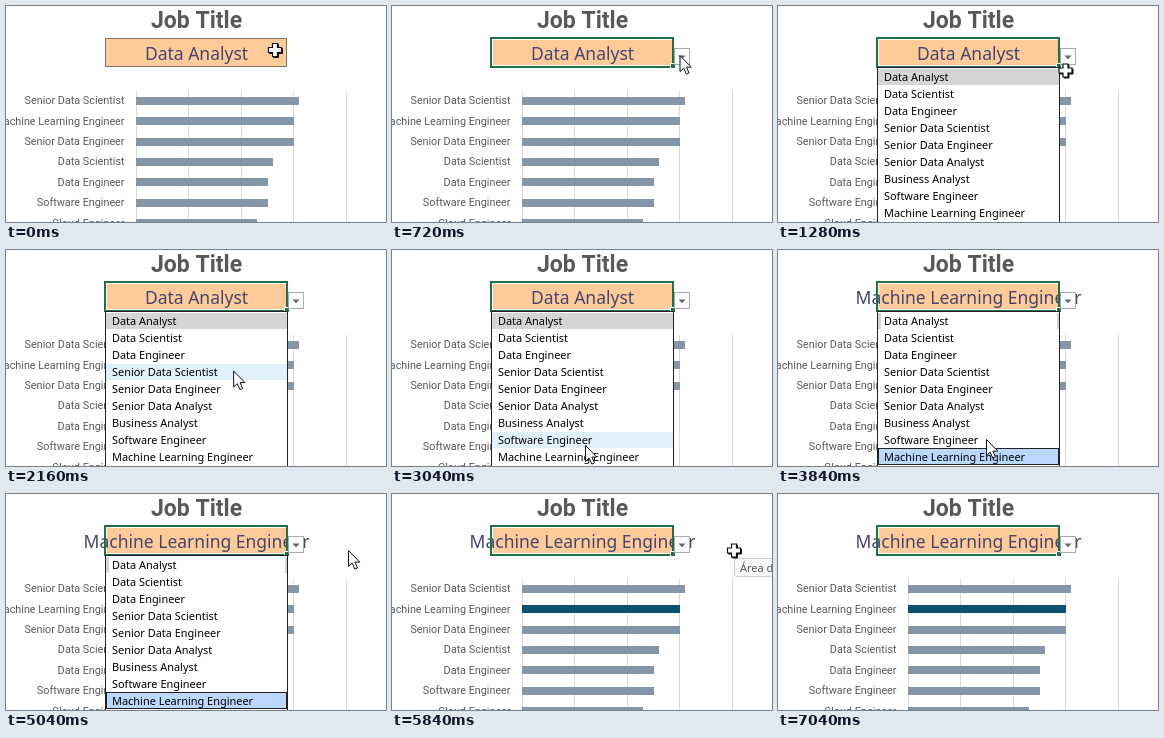
Write an HTML page with a canvas that moves like this. It is 380 px wide and 216 px high and loops after 7200 ms.

```html
<!DOCTYPE html>
<html lang="en">
<head>
<meta charset="utf-8">
<title>Job title dropdown</title>
<style>
  html, body { margin: 0; width: 100%; height: 100%; overflow: hidden; background: #fff; }
  canvas { display: block; width: 380px; height: 216px; }
</style>
</head>
<body>
<canvas id="stage"></canvas>
<script>
const W = 380, H = 216, LOOP = 7200, STEP = 80;
const canvas = document.getElementById('stage');
const ctx = canvas.getContext('2d');
const ratio = window.devicePixelRatio || 1;
canvas.width = W * ratio;
canvas.height = H * ratio;

const ROBOTO = 'Roboto, sans-serif', NOTO = '"Noto Sans", sans-serif';
const ML = 'Machine Learning Engineer';
const BARS = [
  ['Senior Data Scientist', 293], [ML, 288], ['Senior Data Engineer', 288],
  ['Data Scientist', 267], ['Data Engineer', 262], ['Software Engineer', 262],
  ['Cloud Engineer', 251]
];
const OPTIONS = [
  'Data Analyst', 'Data Scientist', 'Data Engineer', 'Senior Data Scientist',
  'Senior Data Engineer', 'Senior Data Analyst', 'Business Analyst',
  'Software Engineer', ML
];
const ROW = 17, LIST_TOP = 63;

// When each part of the interaction happens, in ms
const SELECT = 240, OPEN = 960, PICK = 3440, COMMIT = 3600, CLOSE = 5120;
const TIP_IN = 5600, TIP_OUT = 6560;

// Pointer path: time, x, y
const PATH = [
  [0, 269, 44], [320, 269, 44], [800, 289, 50], [1040, 289, 50],
  [1280, 287.5, 64.5], [1520, 287.5, 64.5], [2240, 225, 123], [2960, 225, 123],
  [3040, 193, 195.5], [3280, 198, 206], [3440, 198, 206], [3760, 208, 189.5],
  [3920, 208, 189.5], [4640, 342, 56.5], [6000, 342, 56.5], [6240, 395, 56.5]
];

const clamp = v => Math.max(0, Math.min(1, v));

function pointerAt(t) {
  const next = PATH.findIndex(key => key[0] > t);
  if (next < 0) return PATH[PATH.length - 1].slice(1);
  const [t0, x0, y0] = PATH[next - 1], [t1, x1, y1] = PATH[next];
  const p = (t - t0) / (t1 - t0), e = p * p * (3 - 2 * p);
  return [x0 + (x1 - x0) * e, y0 + (y1 - y0) * e];
}

function box(x, y, w, h, fill, stroke, line = 1) {
  if (fill) {
    ctx.fillStyle = fill;
    ctx.fillRect(x, y, w, h);
  }
  if (stroke) {
    ctx.strokeStyle = stroke;
    ctx.lineWidth = line;
    ctx.strokeRect(x, y, w, h);
  }
}

function text(str, x, y, font, color, align = 'left') {
  ctx.font = font;
  ctx.fillStyle = color;
  ctx.textAlign = align;
  ctx.fillText(str, x, y);
}

function shape(points, fill, stroke, line = 1) {
  ctx.beginPath();
  points.forEach(([x, y]) => ctx.lineTo(x, y));
  ctx.closePath();
  ctx.fillStyle = fill;
  ctx.fill();
  if (stroke) {
    ctx.strokeStyle = stroke;
    ctx.lineWidth = line;
    ctx.stroke();
  }
}

function drawChart(t) {
  for (let i = 0; i < 5; i++) box(Math.round(129.5 + i * 52.6), 85, 1, H, '#d9d9d9');
  BARS.forEach(([label, end], i) => {
    const y = 94.8 + i * 20.35;
    const active = label === ML && t >= CLOSE;
    text(label, 118.5, y + 3.6, `10.8px ${ROBOTO}`, '#595959', 'right');
    box(130, Math.round(y - 4), end - 130, 8, active ? '#0d5070' : '#8496a7');
  });
}

function drawCell(t) {
  const selected = t >= SELECT;
  if (selected) box(101, 34, 179, 25, '#ffcc99');
  else box(99.5, 32.5, 181, 28, '#ffcc99', '#7f7568');
  text(t >= COMMIT ? ML : 'Data Analyst', 190.5, 54, `17.5px ${NOTO}`, '#454570', 'center');
  if (!selected) return;
  box(99, 32, 182, 29, null, '#1e7145', 2);
  box(278, 57, 6, 6, '#fff');
  box(279, 58, 4, 4, '#1e7145');
  box(282.5, 42.5, 15, 16, '#fdfdfd', '#ababab');
  shape([[286.5, 49.5], [293.5, 49.5], [290, 53.2]], '#666');
}

function drawList(t, x, y) {
  box(99.5, 61.5, 182, 170, '#fff', '#222');
  const picked = t >= PICK;
  const hover = x < 281 && y > LIST_TOP ? Math.floor((y - LIST_TOP) / ROW) : -1;
  OPTIONS.forEach((option, i) => {
    const top = LIST_TOP + i * ROW;
    if (i === 0) {
      box(100, top, 181, 16, '#d5d5d5');
      if (picked) box(103, top, 176, 16, '#fff');
    } else if (picked && option === ML) {
      box(100.5, top - 0.5, 180, 16, '#b9d8fb', '#222');
    } else if (!picked && i === hover) {
      box(100, top, 181, 16, '#e0f0fc');
    }
    const weight = picked && option === ML ? 500 : 400;
    text(option, 106, top + 12, `${weight} 10.95px ${NOTO}`, '#000');
  });
}

function drawTip(t) {
  ctx.globalAlpha = clamp((t - TIP_IN + STEP) / 240) * clamp((TIP_OUT + STEP - t) / 160);
  ctx.beginPath();
  ctx.roundRect(342.5, 64.5, 90, 18, 2);
  ctx.fillStyle = '#f9f9f9';
  ctx.fill();
  ctx.strokeStyle = '#cfcfcf';
  ctx.lineWidth = 1;
  ctx.stroke();
  text('Área do Gráfico', 348, 77.5, `11px ${NOTO}`, '#575757');
  ctx.globalAlpha = 1;
}

function drawArrow(x, y) {
  const outline = [[0, 0], [0, 16], [3.7, 12.6], [6.3, 18.6], [9, 17.4], [6.4, 11.6], [11.3, 11.6]];
  shape(outline.map(([dx, dy]) => [x + dx + 0.5, y + dy]), '#fff', '#111');
}

function drawCross(x, y) {
  const a = 2.5, b = 6.5;
  const outline = [[-a, -b], [a, -b], [a, -a], [b, -a], [b, a], [a, a],
    [a, b], [-a, b], [-a, a], [-b, a], [-b, -a], [-a, -a]];
  const at = d => outline.map(([dx, dy]) => [x + dx + d, y + dy + d]);
  shape(at(1), '#111', '#111');
  shape(at(0), '#fff', '#111', 1.2);
}

function draw(t) {
  const [x, y] = pointerAt(t);
  ctx.setTransform(ratio, 0, 0, ratio, 0, 0);
  box(0, 0, W, H, '#fff');
  text('Job Title', 190.5, 21.5, `bold 23px ${ROBOTO}`, '#595959', 'center');
  drawChart(t);
  drawCell(t);
  if (t >= OPEN && t < CLOSE) drawList(t, x, y);
  drawTip(t);
  const onButton = t >= 720 && t < 1200;
  const onList = t >= 1600 && t < CLOSE;
  (onButton || onList ? drawArrow : drawCross)(x, y);
}

function frame(now) {
  draw(Math.floor((now % LOOP) / STEP) * STEP);
  requestAnimationFrame(frame);
}
requestAnimationFrame(frame);
</script>
</body>
</html>
```
